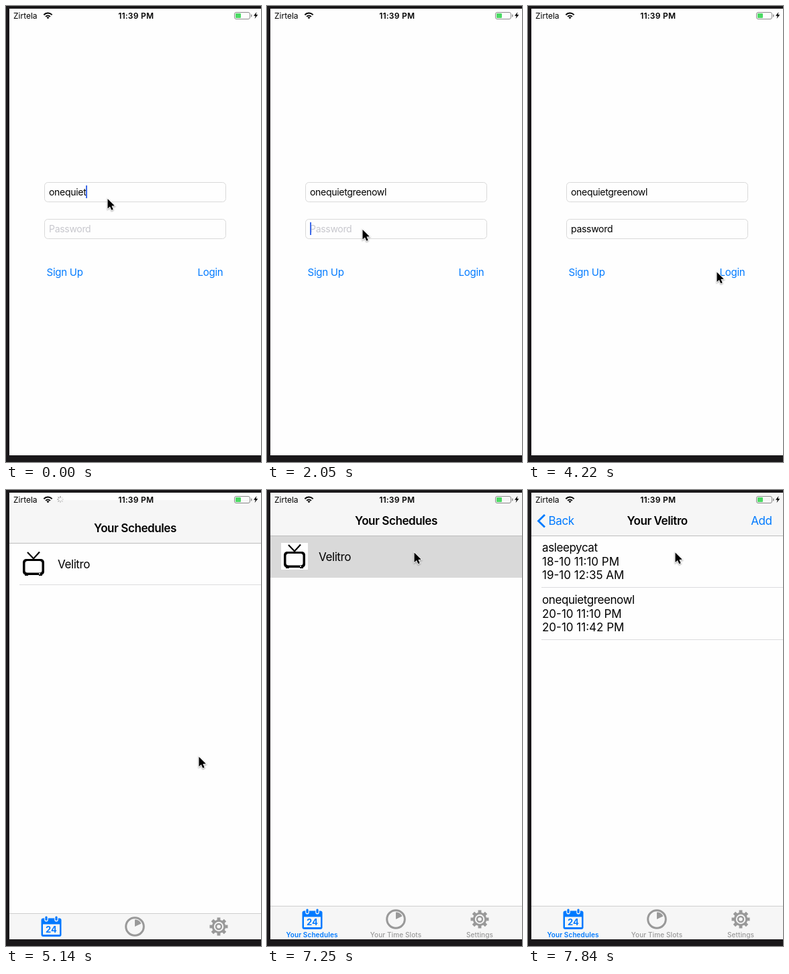
Write an HTML page with a canvas that moves like this. It is 380 px wide and 681 px high and loops after 8000 ms.

```html
<!DOCTYPE html>
<html lang="en">
<head>
<meta charset="utf-8">
<title>Schedule app</title>
<style>
html, body { margin: 0; width: 380px; height: 681px; overflow: hidden; background: #1a181a; }
canvas { display: block; }
</style>
</head>
<body>
<canvas id="stage" width="380" height="681"></canvas>
<script>
const ctx = document.getElementById('stage').getContext('2d');
const LOOP = 8000, BLUE = '#007aff', GRAY = '#999', PAPER = '#fefefe', BAR = '#f6f6f6', LINE = '#dcdcde';
const USER = 'onequietgreenowl', OTHER = 'asleepycat', SERVICE = 'Velitro', NETWORK = 'Zirtela';

// Moments at which one more letter appears
const userKeys = [60, 290, 530, 700, 820, 960, 1120, 1290];
const passKeys = [2530, 2645, 2760, 2930, 3110, 3230, 3340, 3460];
// Pointer stops: time, x, y
const pointerPath = [
  [0, 151.5, 288], [1650, 151.5, 288], [2050, 142.5, 334], [3690, 142.5, 334],
  [4220, 281.5, 397.5], [4450, 281.5, 397.5], [4600, 287.5, 398.5], [5600, 287.5, 398.5],
  [5730, 286.5, 398.5], [5960, 266, 495], [6110, 245, 527], [6320, 219, 455],
  [6550, 204, 322], [6900, 216, 78], [7020, 219.5, 93.5], [LOOP, 219.5, 93.5]
];

const typed = (keys, t) => keys.filter(k => k <= t).length;

// Remaining share of a critically damped move: 1 at the start, 0 when settled
function remaining(t, start) {
  const u = (t - start) * 0.01826;
  return u < 0 ? 1 : (1 + u) * Math.exp(-u);
}

// Monotone cubic through the pointer stops, at rest on holds and turns
function pointerAxis(t, axis) {
  const p = pointerPath;
  const slope = i => p[i + 1] && p[i] ? (p[i + 1][axis] - p[i][axis]) / (p[i + 1][0] - p[i][0]) : 0;
  const tangent = i => {
    const a = slope(i - 1), b = slope(i);
    return a * b > 0 ? 2 * a * b / (a + b) : 0;
  };
  let i = 0;
  while (i < p.length - 2 && t >= p[i + 1][0]) i++;
  const span = p[i + 1][0] - p[i][0], s = (t - p[i][0]) / span, r = 1 - s;
  return p[i][axis] * (1 + 2 * s) * r * r + p[i + 1][axis] * s * s * (3 - 2 * s)
    + span * (tangent(i) * s * r * r - tangent(i + 1) * s * s * r);
}

function text(str, x, y, size, color = '#000', spacing = -0.41, weight = 400, align = 'left') {
  ctx.font = `${weight} ${size}px Inter, sans-serif`;
  ctx.letterSpacing = spacing + 'px';
  ctx.textAlign = align;
  ctx.fillStyle = color;
  ctx.fillText(str, x, y);
  return ctx.measureText(str).width;
}

function box(x, y, w, h, color) {
  ctx.fillStyle = color;
  ctx.fillRect(x, y, w, h);
}

function round(x, y, w, h, r, fill, stroke) {
  ctx.beginPath();
  ctx.roundRect(x, y, w, h, r);
  if (fill) { ctx.fillStyle = fill; ctx.fill(); }
  if (stroke) { ctx.strokeStyle = stroke; ctx.lineWidth = 1; ctx.stroke(); }
}

function trace(points, closed) {
  ctx.beginPath();
  points.forEach(([x, y]) => ctx.lineTo(x, y));
  if (closed) ctx.closePath();
}

function line(points, color, width) {
  trace(points);
  ctx.strokeStyle = color;
  ctx.lineWidth = width;
  ctx.stroke();
}

function ring(x, y, r, width, color, from = 0, to = 2 * Math.PI) {
  ctx.beginPath();
  ctx.arc(x, y, r, from, to);
  ctx.strokeStyle = color;
  ctx.lineWidth = width;
  ctx.stroke();
}

// Draws with a shift and opacity, then restores the state
function layer(dx, dy, alpha, draw) {
  ctx.save();
  ctx.translate(dx, dy);
  ctx.globalAlpha *= alpha;
  draw();
  ctx.restore();
}

function clipTo(x, y, w, h) {
  ctx.beginPath();
  ctx.rect(x, y, w, h);
  ctx.clip();
}

function field(y, value, hint, focused) {
  round(57.5, y + 0.5, 270, 29, 5, null, '#d9d9d9');
  if (!value) text(hint, 64, y + 20, 14, '#c7c7cd', -0.3);
  const width = value ? text(value, 64, y + 20, 14, '#000', -0.3) : 0;
  if (focused) box(Math.round(63.7 + width), y + 5, 2, 19, '#3f6bea');
}

function suggestion() {
  round(61.5, 288.5, 137, 21, 4, '#fff', '#c8c8c8');
  text('one quiet green', 67, 304, 14, BLUE, -0.3);
  line([[186, 296], [192, 302]], GRAY, 1.2);
  line([[192, 296], [186, 302]], GRAY, 1.2);
}

function loginScreen(t) {
  box(5, 4, 375, 667, PAPER);
  field(263, USER.slice(0, 8 + typed(userKeys, t)), 'Username', t < 2000);
  field(318, 'password'.slice(0, typed(passKeys, t)), 'Password', t >= 2000 && t < 4170);
  text('Sign Up', 60.5, 403, 15, BLUE, -0.24);
  text('Login', 285.5, 403, 15, BLUE, -0.24);
  if (t >= 290 && t < 600) suggestion();
}

function television() {
  box(21, 79, 40, 40, PAPER);
  line([[32, 82], [41, 91.5], [50, 81.5]], '#000', 2.2);
  round(25, 92, 32, 24, 5, '#000');
  box(28, 115, 5, 2, '#000');
  box(49, 115, 5, 2, '#000');
  round(28.5, 95, 25, 17.5, 3.5, PAPER);
  box(49, 113.5, 2, 1.5, PAPER);
}

function scheduleList(selected) {
  box(5, 69, 375, 552, PAPER);
  if (selected) box(5, 69, 375, 62, '#d9d9d9');
  else box(20, 130, 360, 1, LINE);
  television();
  text(SERVICE, 77, 105.5, 17);
}

function slotList() {
  box(5, 69, 375, 552, PAPER);
  const rows = [
    [OTHER, '18-10 11:10 PM', '19-10 12:35 AM'],
    [USER, '20-10 11:10 PM', '20-10 11:42 PM']
  ];
  rows.forEach((lines, i) => {
    lines.forEach((str, j) => text(str, 21, 92.4 + 78 * i + 20.4 * j, 17, '#000', j ? 0 : -0.41));
    box(20, 145 + 78 * i, 360, 1, LINE);
  });
}

function calendarIcon() {
  round(52.5, 628.5, 30, 27.5, 3, BLUE);
  box(55, 637.5, 25, 15.5, BAR);
  for (const x of [60, 75]) {
    round(x - 2.8, 625, 5.6, 8.5, 2.8, BAR);
    round(x - 1.6, 625.5, 3.2, 6.5, 1.6, BLUE);
  }
  text('24', 67.5, 650, 13, BLUE, 0, 700, 'center');
}

function clockIcon() {
  ring(192, 641, 13.3, 3, GRAY);
  ctx.beginPath();
  ctx.moveTo(192, 641);
  ctx.arc(192, 641, 10.5, -Math.PI / 2, -Math.PI / 7);
  ctx.fillStyle = GRAY;
  ctx.fill();
}

function gearIcon() {
  layer(317, 641, 1, () => {
    for (let i = 0; i < 8; i++) {
      ctx.rotate(Math.PI / 4);
      box(-2.4, -13.5, 4.8, 5, GRAY);
    }
    ring(0, 0, 8.7, 3, GRAY);
    ring(0, 0, 4, 2.4, GRAY);
  });
}

function tabBar() {
  box(5, 621, 375, 50, BAR);
  box(5, 621, 375, 1, '#cfcfcf');
  calendarIcon();
  clockIcon();
  gearIcon();
  ['Your Schedules', 'Your Time Slots', 'Settings'].forEach((label, i) =>
    text(label, 67 + 125 * i, 667.5, 10, i ? GRAY : BLUE, 0.1, i ? 500 : 600, 'center'));
}

function navBar(push) {
  const left = 1 - push;
  const title = (str, x) => text(str, x, 52, 17, '#000', -0.41, 600, 'center');
  box(5, 4, 375, 64, BAR);
  box(5, 68, 375, 1, '#bdbdbd');
  layer(-130 * push, 0, left, () => title('Your Schedules', 192.5));
  if (!push) return;
  layer(0, 0, push, () => {
    line([[25, 37], [15.5, 46.3], [25, 55.6]], BLUE, 2.8);
    text('Back', 30.5 + 120 * left, 52, 17, BLUE);
    title('Your ' + SERVICE, 192.5 + 170 * left);
    text('Add', 363.5, 52, 17, BLUE, -0.41, 400, 'right');
  });
}

function mainScreen(t) {
  const left = remaining(t, 7310), push = 1 - left;
  layer(0, 0, 1, () => {
    clipTo(5, 69, 375, 552);
    layer(Math.round(-112 * push), 0, 1, () => scheduleList(t >= 7250));
    box(5, 69, 375, 552, `rgba(0,0,0,${0.1 * push})`);
    if (push) layer(Math.round(375 * left), 0, 1, slotList);
  });
  navBar(push);
  tabBar();
}

function spinner(t) {
  const step = Math.floor(t / 125);
  for (let i = 0; i < 8; i++) {
    layer(81, 14, 0.15 + 0.6 * ((i - step % 8 + 8) % 8) / 7, () => {
      ctx.rotate(i * Math.PI / 4);
      line([[0, -2.3], [0, -5]], '#555', 1.1);
    });
  }
}

function statusBar(t) {
  text(NETWORK, 11, 18.5, 12, '#000', 0);
  for (const r of [4.6, 8.4]) ring(62.5, 19, r, 2, '#000', -Math.PI * 0.76, -Math.PI * 0.24);
  ctx.beginPath();
  ctx.moveTo(62.5, 19.3);
  ctx.arc(62.5, 19, 2.6, -Math.PI * 0.77, -Math.PI * 0.23);
  ctx.fillStyle = '#000';
  ctx.fill();
  text('11:39 PM', 193.7, 18.5, 12, '#000', 0.25, 600, 'center');
  round(340.5, 9.5, 23, 10, 2.5, null, '#8a8a8a');
  round(342, 11, 8, 7, 1, '#4cd964');
  round(365, 12.5, 1.5, 4, 0.7, '#8a8a8a');
  trace([[373.5, 9], [369, 14.8], [371.8, 14.8], [370.6, 19], [375.3, 13], [372.5, 13]], true);
  ctx.fillStyle = '#000';
  ctx.fill();
  if ((t >= 4450 && t < 5200) || (t >= 7310 && t < 7780)) spinner(t);
}

function pointer(t) {
  layer(pointerAxis(t, 1), pointerAxis(t, 2), 1, () => {
    trace([[0, 0], [0, 14.5], [3.4, 11.4], [5.8, 16.8], [8.2, 15.7], [5.9, 10.5], [10.3, 10.3]], true);
    ctx.shadowColor = 'rgba(0,0,0,.4)';
    ctx.shadowBlur = 2;
    ctx.shadowOffsetY = 1;
    ctx.strokeStyle = '#fff';
    ctx.lineWidth = 1.8;
    ctx.stroke();
    ctx.shadowColor = 'transparent';
    ctx.fillStyle = '#000';
    ctx.fill();
  });
}

function draw(t) {
  box(0, 0, 380, 681, '#1a181a');
  layer(0, 0, 1, () => {
    clipTo(5, 4, 375, 667);
    loginScreen(t);
    layer(0, Math.round(667 * remaining(t, 4808)), 1, () => mainScreen(t));
    statusBar(t);
    pointer(t);
  });
}

const start = performance.now();
function tick() {
  draw((performance.now() - start) % LOOP);
  requestAnimationFrame(tick);
}
tick();
</script>
</body>
</html>
```
